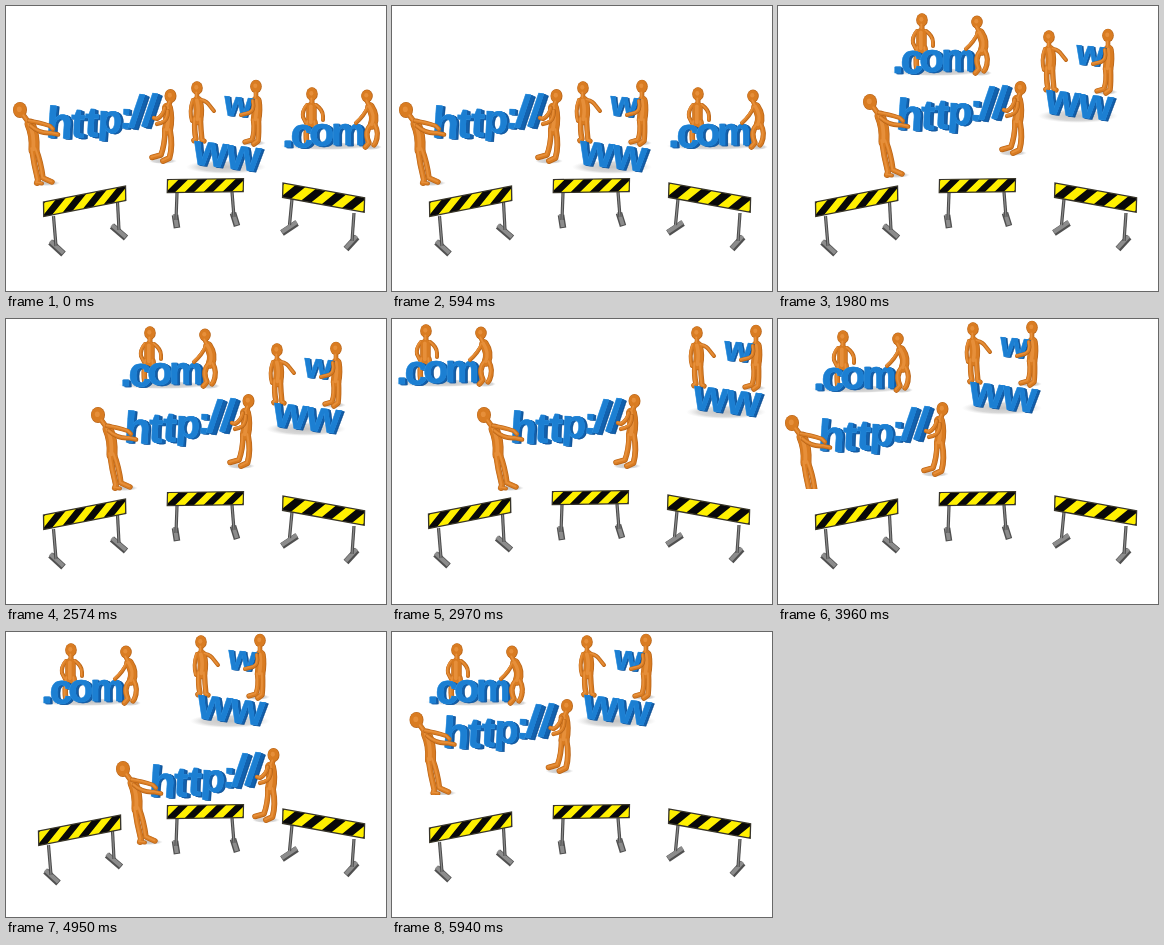
An HTML page that plays this animation: 380 by 285 pixels, repeating every 6930 ms.

```html
<!DOCTYPE html>
<html lang="en">
<head>
<meta charset="utf-8">
<title>Under construction</title>
<style>
html, body { margin: 0; width: 100%; height: 100%; overflow: hidden; background: #fff; }
svg { display: block; width: 100%; height: 100%; }
text { font: bold 40px "Liberation Sans", Arial, sans-serif; stroke-linejoin: round; }
</style>
</head>
<body>
<svg id="stage" viewBox="0 0 380 285" xmlns="http://www.w3.org/2000/svg"></svg>
<script>
const STEP = 990;
const stage = document.getElementById('stage');

// Rounded limbs shaded in three passes: edge, body, sheen
const TONES = [
  ['#b8651a', w => w, 0],
  ['#d97c22', w => w - 1.2, -0.2],
  ['#e68f3a', w => w * 0.35, -0.7]
];

function man(head, limbs) {
  return TONES.map(([color, width, shift]) => {
    const paths = limbs.map(([d, w]) =>
      `<path d="${d}" stroke-width="${width(w).toFixed(2)}"/>`).join('');
    let ball = '';
    if (head) {
      const [x, y, rx, ry] = head;
      ball = `<ellipse cx="${x}" cy="${y}" rx="${width(rx * 2) / 2}" ry="${width(ry * 2) / 2}" fill="${color}" stroke="none"/>`;
    }
    return `<g transform="translate(${shift} ${shift})" fill="none" stroke="${color}" stroke-linecap="round" stroke-linejoin="round">${paths}${ball}</g>`;
  }).join('');
}

// Extruded letter: dark copies behind a bright face
function letter(ch, x, y, size, turn = 0, depth = 3) {
  const copy = (d, color, w) =>
    `<text x="${d}" y="${d * 0.3}" style="font-size:${size}px" fill="${color}" stroke="${color}" stroke-width="${w}">${ch}</text>`;
  let out = '';
  for (let d = depth; d > 0; d--) out += copy(d, d === depth ? '#0f4f92' : '#1462ae', 0.4);
  out += copy(0, '#3a9be6', 0.5) + copy(0.3, '#1c7fd2', 0.1);
  return `<g transform="translate(${x} ${y}) rotate(${turn})">${out}</g>`;
}

const word = rows => rows.map(r => letter(...r)).join('');

const shadow = (x, y, rx, ry) =>
  `<ellipse cx="${x}" cy="${y}" rx="${rx}" ry="${ry}" fill="url(#shade)"/>`;

// Slanted bars on an 80 x 14 panel placed by a matrix
let bars = '';
for (let x = -22; x < 90; x += 20) bars += `M${x + 14} 0h10l-14 14h-10z`;

function barrier(matrix, posts, feet) {
  const legs = posts.map(d =>
    `<path d="${d}" stroke="#4a4a4a" stroke-width="3.2"/><path d="${d}" stroke="#8a8a8a" stroke-width="1.2"/>`).join('');
  const slabs = feet.map(d =>
    `<path d="${d}" stroke="#505050" stroke-width="6.6"/><path d="${d}" stroke="#8c8c8c" stroke-width="4" transform="translate(-.2 -1)"/>`).join('');
  return `<g fill="none">${slabs}${legs}</g>
    <g transform="matrix(${matrix})">
      <rect width="80" height="14" fill="#fff000"/>
      <path d="${bars}" clip-path="url(#panel)" fill="#080808"/>
      <rect width="80" height="14" fill="none" stroke="#37342a" stroke-width="1.3"/>
    </g>`;
}

const httpCrew =
  shadow(40, 177, 14, 3) + shadow(157, 155, 14, 3) +
  man([14, 104, 7, 8], [
    ['M18 110L23 117', 5.5],
    ['M24 118Q29 129 28 144', 11],
    ['M26 143Q28 158 32 174L31 177', 6],
    ['M30 143Q35 156 37 172L46 176', 5.5],
    ['M31 177L36 177.5', 4]
  ]) +
  man([164.5, 90, 6, 7], [
    ['M164 96L162 101', 5],
    ['M161.5 102Q164 112 161.5 124', 11],
    ['M159 124Q159 138 155 149L146 151.5', 5.5],
    ['M164 124Q167 140 163.5 152L157 155', 5.8]
  ]) +
  word([
    ['h', 39, 131, 44, 4],
    ['t', 64, 131, 42, 3, 4],
    ['t', 78, 130, 42, 3, 4],
    ['p', 91, 126, 40, 3],
    [':', 113, 122, 38, 3],
    ['/', 122, 120, 46, 8, 5],
    ['/', 135, 119, 46, 8, 5]
  ]) +
  man(null, [['M23 115Q32 116 44 120L47 123', 4.4], ['M25 120Q34 128 45 127L52 128.5', 4.6]]) +
  man(null, [['M159 102Q157 110 151 113L148 112', 4.4], ['M162 105Q162 115 155 117L151 118', 4.2]]);

const wwwCrew =
  shadow(220, 161, 40, 7) + shadow(247, 137, 13, 3) +
  man([191, 82, 5.8, 6.8], [
    ['M191 87V92', 4.5],
    ['M191.5 95Q194 104 192 114', 10.5],
    ['M189 113Q188 125 190 133L188 134.5', 5.5],
    ['M194.5 113Q195 125 196 134L198 135', 5.3],
    ['M187 94Q183 105 186 115', 4],
    ['M195 94Q201 95 204 100L208 105', 4]
  ]) +
  man([250, 80.5, 5.8, 6.8], [
    ['M250 87V92', 4.6],
    ['M250.5 95Q252 104 250 114', 10.5],
    ['M247.5 114Q249 126 246 134L239 136', 5.2],
    ['M252.5 114Q253 127 252 135L248 138', 5.5]
  ]) +
  word([
    ['w', 217, 109, 36, 5, 2],
    ['w', 186, 158, 44, 6],
    ['w', 219, 162, 44, 6]
  ]) +
  man(null, [['M247 95Q249 105 243 107L235 109', 4]]);

const comCrew =
  shadow(320, 140, 46, 4) + shadow(365, 141, 11, 3) +
  man([306, 88, 5.8, 6.8], [
    ['M306 93V97', 5],
    ['M305.5 101V117', 10.5],
    ['M302 116Q299 127 301 138', 5.5],
    ['M309 116L311 136', 5.5],
    ['M301 99Q296 105 297 111L300 117', 4],
    ['M310 99Q317 104 317 110L317 114', 4]
  ]) +
  word([
    ['.', 276, 141, 40, 0],
    ['c', 284, 141, 42, 2],
    ['o', 303, 140, 41, 0],
    ['m', 325, 139, 38, 0]
  ]) +
  man([361, 90, 5.8, 6.5], [
    ['M361 95L363 99', 5],
    ['M364 101Q370 110 366.5 119', 9.5],
    ['M365 119Q358 126 363 137L359.5 141', 5.5],
    ['M369 119Q373.5 127 369.5 137L368 139', 5.2],
    ['M362 101Q358 110 350 117', 4]
  ]);

const leftBarrier = barrier('1.025 -.2 .02 1.04 37.5 196',
  ['M47.5 210L50 240', 'M111.5 196L113 224'],
  ['M44.5 236L57.5 248', 'M106 220L120 232']);
const midBarrier = barrier('.95 -.012 -.02 .94 161.5 173.5',
  ['M171 187L170 214', 'M226 186L228 211'],
  ['M169 209L171 222', 'M227 207L231 220']);
const rightBarrier = barrier('1.02 .185 -.03 1.03 277 177',
  ['M286 193L283.5 219', 'M348 207L346 235'],
  ['M291 217L276 227', 'M351 231L340 243']);

stage.innerHTML = `
  <defs>
    <radialGradient id="shade">
      <stop offset="0" stop-color="#999" stop-opacity=".6"/>
      <stop offset=".7" stop-color="#aaa" stop-opacity=".45"/>
      <stop offset="1" stop-color="#ccc" stop-opacity="0"/>
    </radialGradient>
    <clipPath id="panel"><rect width="80" height="14"/></clipPath>
    <clipPath id="floor"><rect id="cut" width="380" height="285"/></clipPath>
  </defs>
  <g id="com">${comCrew}</g>
  <g id="www">${wwwCrew}</g>
  <g clip-path="url(#floor)"><g id="http">${httpCrew}</g></g>
  <g id="fences"><g id="left">${leftBarrier}</g>${midBarrier}${rightBarrier}</g>`;

// Offset of each group per step
const home = [0, 0];
const comTop = [-241, -70];
const wwwTop = [4, -72];
const moves = {
  com: [home, comTop, [-162, -74], [-272, -76], comTop, comTop, comTop],
  www: [home, home, [80, -51], [114, -68], wwwTop, wwwTop, wwwTop],
  http: [home, home, [78, -8], [78, -8], home, [103, 33], [10.5, -16]],
  left: [home, home, home, home, home, [-5, 3], home],
  fences: [home, home, home, [-1, -1], home, home, home]
};
const floorY = [285, 285, 285, 285, 170, 285, 163];
const parts = Object.keys(moves).map(id => [document.getElementById(id), moves[id]]);
const cut = document.getElementById('cut');
const start = performance.now();

function draw(now) {
  const i = Math.floor(Math.max(0, now - start) / STEP) % 7;
  for (const [el, spots] of parts) el.setAttribute('transform', `translate(${spots[i]})`);
  cut.setAttribute('height', floorY[i]);
  requestAnimationFrame(draw);
}
draw(start);
</script>
</body>
</html>
```
